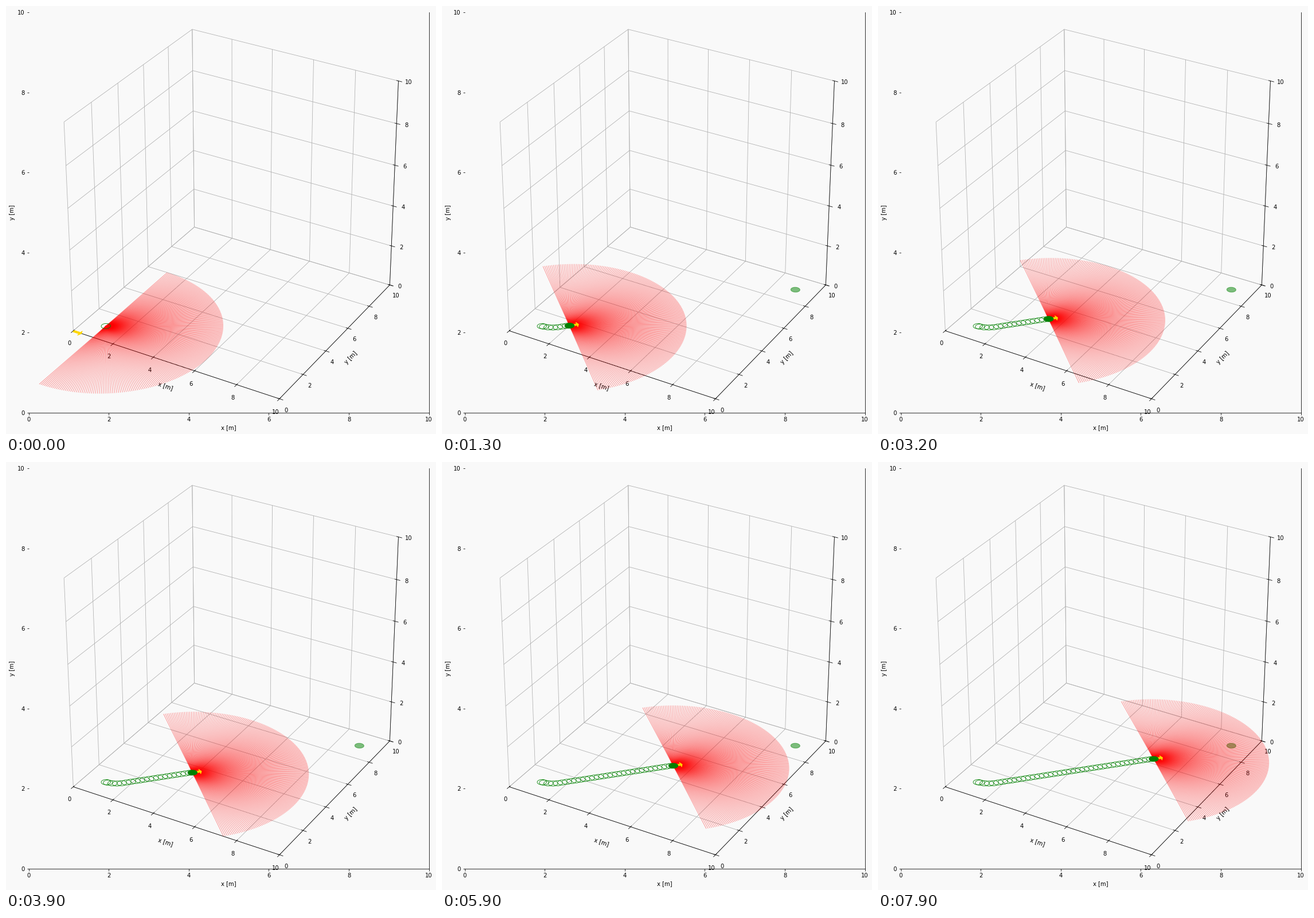
Animation, 750 px wide and 746 px high, one loop 8 s. Source, as a matplotlib script:

```python
import numpy as np
import matplotlib.pyplot as plt
from matplotlib.animation import FuncAnimation
from mpl_toolkits.mplot3d.art3d import Line3DCollection, Poly3DCollection

W, H, DPI = 750, 746, 72
STEPS, INTERVAL = 80, 100
BG = "#f9f9f9"
GREEN = (0, 0.5, 0)

RADIUS = 0.2
GOAL = (9, 9)
RANGE, RAYS = 5, 200
STEP, TURN, MAX_TURN = 0.1, 0.1, 0.8
TRAIL_EVERY = 2

# Robot path: turn on the spot first, then drive while turning to the final heading
heading = np.minimum(TURN * np.arange(STEPS), MAX_TURN)
speed = np.full(STEPS - 1, STEP)
speed[0] = 0
moves = speed[:, None] * np.column_stack([np.cos(heading[:-1]), np.sin(heading[:-1])])
path = np.vstack([[1, 1], [1, 1] + np.cumsum(moves, axis=0)])


def on_floor(xy):
    xy = np.asarray(xy, dtype=float)
    return np.column_stack([xy, np.zeros(len(xy))])


def circle(center):
    a = np.linspace(0, 2 * np.pi, 49)
    return on_floor(np.column_stack([np.cos(a), np.sin(a)]) * RADIUS + center)


def arrow(pos, angle, length=0.4, width=0.6):
    shape = np.array([[0, 0.1], [0, -0.1], [0.8, -0.1], [0.8, -0.3],
                      [1, 0], [0.8, 0.3], [0.8, 0.1]]) * [length, width]
    c, s = np.cos(angle), np.sin(angle)
    return on_floor(shape @ np.array([[c, s], [-s, c]]) + pos)


def rays(pos, angle):
    a = angle + np.linspace(-np.pi / 2, np.pi / 2, RAYS)
    tips = on_floor(pos + RANGE * np.column_stack([np.cos(a), np.sin(a)]))
    return np.stack([np.broadcast_to([*pos, 0], tips.shape), tips], axis=1)


plt.rcParams.update({"font.family": "DejaVu Sans", "font.size": 10})
fig = plt.figure(figsize=(W / DPI, H / DPI), dpi=DPI, facecolor=BG)
box = [39.6 / W, 37 / H, 698 / W, 698 / H]
ticks = range(0, 11, 2)

flat = fig.add_axes(box, facecolor=BG)
flat.set(xlim=(0, 10), ylim=(0, 10), xticks=ticks, yticks=ticks,
         xlabel="x [m]", ylabel="y [m]")
flat.spines[["left", "top"]].set_visible(False)

ax = fig.add_axes(box, projection="3d", computed_zorder=False)
ax.patch.set_visible(False)
ax.set_box_aspect((1, 1, 1))
ax.view_init(elev=30, azim=-60)

goal = Poly3DCollection([circle(GOAL)], facecolors=[(*GREEN, 0.5)],
                        edgecolors=[(*GREEN, 0.5)], linewidths=1, zorder=1)
fan = Line3DCollection(rays(path[0], 0), colors=[(1, 0, 0, 0.4)],
                       linewidths=1, zorder=2)
pointer = Poly3DCollection([arrow((0, 0), 0)], facecolors=["gold"],
                           edgecolors=["gold"], linewidths=1, zorder=3)
trail = Line3DCollection([circle(path[0])], colors=[GREEN],
                         linewidths=0.8, zorder=4)
robot = Poly3DCollection([circle(path[0])], facecolors=[GREEN],
                         edgecolors=[GREEN], linewidths=1, zorder=5)
artists = [goal, fan, pointer, trail, robot]
for artist in artists:
    ax.add_collection3d(artist)

ax.set(xlim=(0, 10), ylim=(0, 10), zlim=(0, 10),
       xticks=ticks, yticks=ticks, zticks=ticks, xlabel="x [m]", ylabel="y [m]")
for axis in (ax.xaxis, ax.yaxis, ax.zaxis):
    axis.set_pane_color(BG)


def draw(k):
    pos, angle = path[k], heading[k]
    started = k > 0
    goal.set_visible(started)
    robot.set_visible(started)
    robot.set_verts([circle(pos)])
    # The pointer rests at the origin until the first step
    pointer.set_verts([arrow(pos, angle) if started else arrow((0, 0), 0)])
    fan.set_segments(rays(pos, angle))
    trail.set_segments([circle(p) for p in path[:k + 1:TRAIL_EVERY]])
    return artists


anim = FuncAnimation(fig, draw, frames=STEPS, init_func=lambda: draw(0),
                     interval=INTERVAL, repeat=True, repeat_delay=0, blit=False)
plt.show()
```
